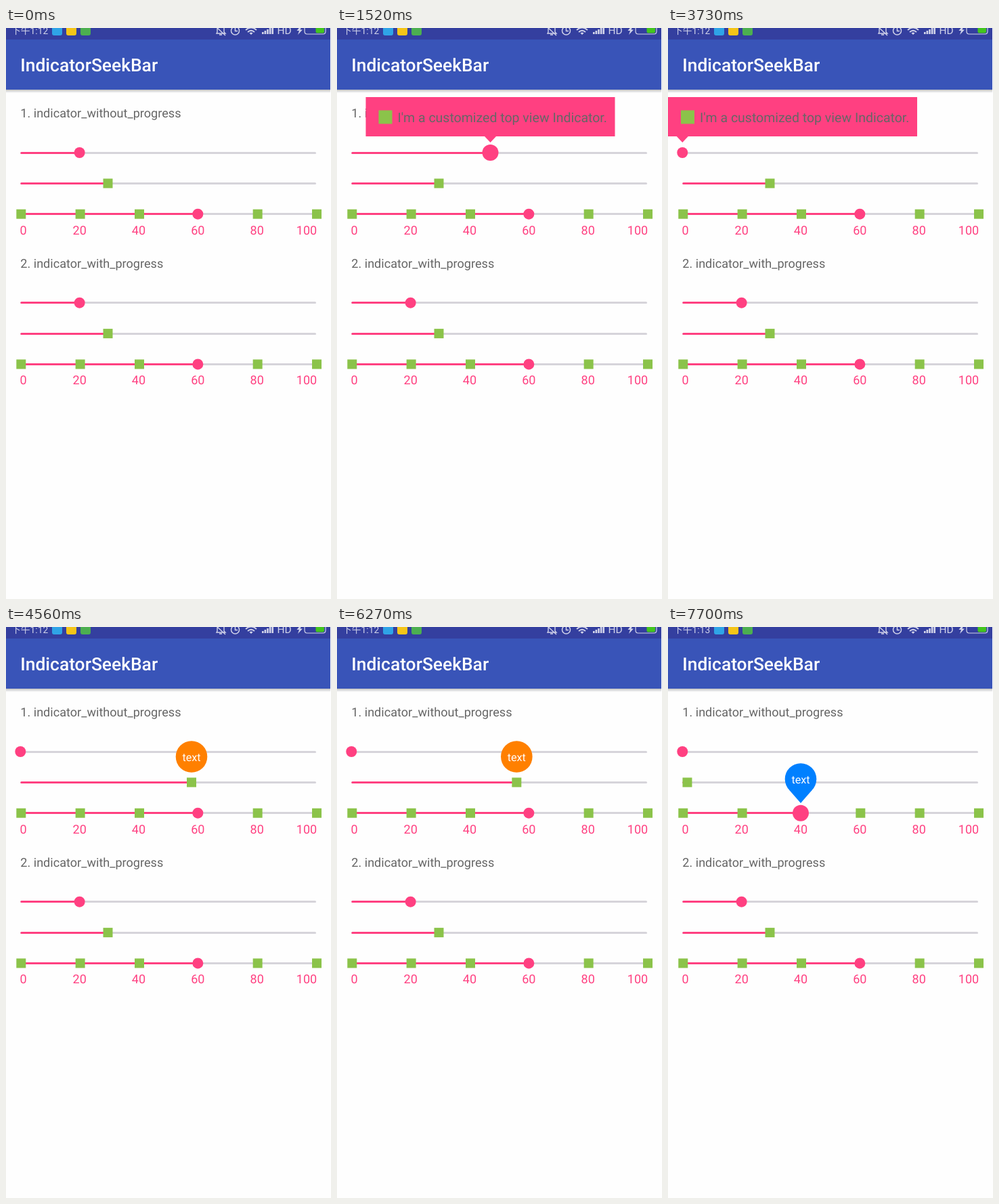
An HTML page with a canvas that plays this animation: 480x843 px, repeating every 8 s.

```html
<!DOCTYPE html>
<html lang="en">
<head>
<meta charset="utf-8">
<title>IndicatorSeekBar</title>
<style>
  html, body { margin: 0; width: 100%; height: 100%; overflow: hidden; background: #fefefe; }
  canvas { display: block; }
</style>
</head>
<body>
<canvas id="stage" width="480" height="843"></canvas>
<script>
const ctx = document.getElementById('stage').getContext('2d');
const LOOP = 8000, STEP = 95, WIDTH = 479;
const PINK = '#ff4081', GREEN = '#8bc34a', GREY = '#666', PALE = '#d2d4ea';
const LEFT = 21.3, RIGHT = 458;

const at = percent => LEFT + (RIGHT - LEFT) * percent / 100;
const between = (t, start, end) => t >= start && t < end;

// Finger paths: a few turning points as [time, x], straight in between
const topDrag = [[690, 113], [1090, 113], [1520, 226.5], [2290, 449], [2580, 444], [3240, 192], [3540, LEFT]];
const middleDrag = [[4180, 148], [4940, 400], [5430, 456], [5870, 440], [6660, 95], [6940, 50.5], [7260, 28.5]];

function along(path, t) {
  const next = path.findIndex(([time]) => time > t);
  if (next < 0) return path[path.length - 1][1];
  if (next === 0) return path[0][1];
  const [[t0, x0], [t1, x1]] = path.slice(next - 1, next + 1);
  return x0 + (x1 - x0) * (t - t0) / (t1 - t0);
}

function rect(x, y, w, h, color, radius = 0) {
  ctx.fillStyle = color;
  ctx.beginPath();
  ctx.roundRect(x, y, w, h, radius);
  ctx.fill();
}

function disc(x, y, r, color) {
  ctx.fillStyle = color;
  ctx.beginPath();
  ctx.arc(x, y, r, 0, Math.PI * 2);
  ctx.fill();
}

function fill(path, color) {
  ctx.fillStyle = color;
  ctx.fill(new Path2D(path));
}

function line(path, color, width) {
  ctx.strokeStyle = color;
  ctx.lineWidth = width;
  ctx.stroke(new Path2D(path));
}

function text(str, x, y, size, color, align = 'left', weight = 400) {
  ctx.font = `${weight} ${size}px Roboto, "Noto Sans CJK SC", "Noto Sans CJK", sans-serif`;
  ctx.textRendering = 'geometricPrecision';
  ctx.textAlign = align;
  ctx.fillStyle = color;
  ctx.fillText(str, x, y);
}

const marker = (x, y) => rect(x - 7, y - 7, 14, 14, GREEN);

function track(y, x) {
  const top = Math.round(y - 1.5);
  rect(LEFT, top, RIGHT - LEFT, 3, '#d6d4da', 1.5);
  rect(LEFT, top, x - LEFT, 3, PINK, 1.5);
}

function tickedBar(y, x, radius) {
  track(y, x);
  for (let value = 0; value <= 100; value += 20) {
    const tick = at(value) + 1;
    if (Math.abs(tick - x) > 4) marker(tick, y);
    const label = Math.max(25.5, Math.min(444, at(value)));
    text(value, label, y + 30, 18, PINK, 'center');
  }
  disc(x, y, radius, PINK);
}

function section(y, title, x1, r1, x2, x3, r3) {
  text(title, LEFT, y - 52, 18.1, GREY);
  track(y, x1);
  disc(x1, y, r1, PINK);
  track(y + 45.4, x2);
  marker(x2, y + 45.4);
  tickedBar(y + 90.7, x3, r3);
}

function statusBar(t) {
  rect(0, 0, WIDTH, 17, '#343f9f');
  text(t < 6300 ? '下午1:12' : '下午1:13', 8, 9, 13.8, PALE);
  ['#2fa4e7', '#f5c518', '#4caf50'].forEach((color, i) => rect(68 + 21 * i, -4, 15, 15, color, 3));
  line('M312 6V1Q312-4 317-4T322 1V6L324 8H311ZM315 10H319M310-2L324 11', PALE, 1.4);
  line('M344.5 4A6 6 0 1 1 332.5 4A6 6 0 1 1 344.5 4M338.5 0V4.5H342', PALE, 1.5);
  line('M354 3Q362-4 370 3M357 6Q362 1.5 367 6', PALE, 1.8);
  fill('M359.5 7.5Q362 5.5 364.5 7.5L362 10Z', PALE);
  for (let i = 0; i < 5; i++) rect(378 + i * 3.6, 6 - i * 2, 2.6, 3 + i * 2, PALE);
  text('HD', 400.5, 9, 15.5, PALE);
  fill('M435-3L429.5 4H433L431 10L438 2.5H434.5L437-3Z', PALE);
  line('M441-5V5Q441 9 445 9H468Q472 9 472 5V-5', PALE, 1.2);
  rect(457.5, -3, 12.5, 10.5, '#43c51e', 2);
}

function toolbar() {
  rect(0, 17, WIDTH, 74, '#3954b8');
  const shadow = ctx.createLinearGradient(0, 91, 0, 96);
  shadow.addColorStop(0, 'rgba(0,0,0,.24)');
  shadow.addColorStop(1, 'rgba(0,0,0,0)');
  rect(0, 91, WIDTH, 5, shadow);
  text('IndicatorSeekBar', LEFT, 64, 26.4, '#fff', 'left', 500);
}

function tooltip(x, alpha) {
  const width = 368, left = Math.max(0, Math.min(WIDTH - width, x - width / 2));
  ctx.globalAlpha = alpha;
  rect(left, 102, width, 58, PINK);
  fill(`M${x - 8.5} 160H${x + 8.5}L${x} 169Z`, PINK);
  rect(left + 19, 121.5, 20, 20, GREEN);
  text("I'm a customized top view Indicator.", left + 47, 138.5, 19.5, GREY);
  ctx.globalAlpha = 1;
}

function bubble(x, y, color, tail) {
  disc(x, y, 23.3, color);
  if (tail) fill(`M${x - 17} ${y + 16}H${x + 17}L${x} ${y + 35.5}Z`, color);
  text('text', x, y + 6.5, 16.2, '#fff', 'center');
}

function draw(t) {
  const held = t - t % STEP;
  const x1 = t < 690 ? at(20) : along(topDrag, held);
  const x2 = t < 4180 ? 150.5 : along(middleDrag, held);
  const x3 = at(t < 7510 ? 60 : t < 7700 ? 20 : 40);
  rect(0, 0, 480, 843, '#fefefe');
  toolbar();
  statusBar(t);
  section(184, '1. indicator_without_progress',
    x1, between(t, 690, 3730) ? 12 : 8, x2, x3, t >= 7510 ? 12 : 8);
  section(405.7, '2. indicator_with_progress', at(20), 8, 150.5, at(60), 8);
  if (between(t, 1090, 3990)) tooltip(x1, t < 3890 ? 1 : 0.5);
  if (between(t, 4270, 7400)) bubble(x2, 191.5, '#ff8000');
  if (t >= 7600) bubble(x3, 224.5, '#0080ff', true);
}

const begin = performance.now();
function frame() {
  draw((performance.now() - begin) % LOOP);
  requestAnimationFrame(frame);
}
frame();
</script>
</body>
</html>
```
